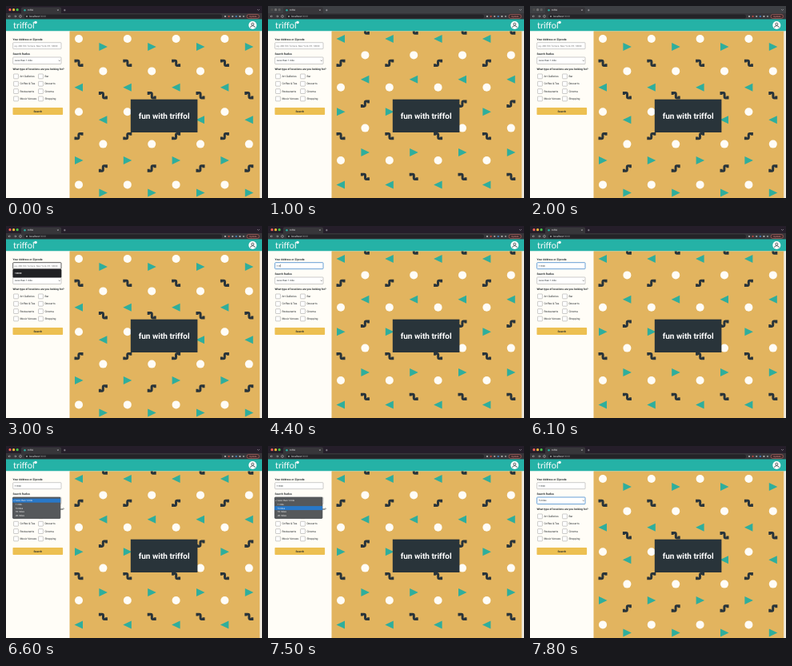
Write an HTML page that moves like this. It is 320 px wide and 240 px high and loops after 8 s.

```html
<!DOCTYPE html>
<html lang="en">
<head>
<meta charset="utf-8">
<title>triffol</title>
<style>
  html, body { margin: 0; width: 100%; height: 100%; overflow: hidden; background: #fffdf7; }
  svg { display: block; width: 100vw; height: 100vh; }
  text { font-family: Roboto, sans-serif; font-size: 3.35px; fill: #20272a; text-rendering: geometricPrecision; }
  .bold { font-weight: 700; }
  .light { fill: #fff; }
  .field { fill: #fff; stroke: #a8a8a8; stroke-width: .6; }
  .focus { stroke: #5796d2; stroke-width: .9; }
  .open { stroke: #333; stroke-width: .8; }
  .typed { font-size: 2.9px; }
  .hint { fill: #777; font-size: 2.95px; }
  .box { fill: #fff; stroke: #999; stroke-width: .5; }
</style>
</head>
<body>
<svg id="stage" viewBox="0 0 320 240" preserveAspectRatio="none">
  <defs>
    <path id="triangle" d="M-5 -5 L5.5 0 L-5 5Z" fill="#2fae9c"/>
    <path id="squiggle" d="M-4 -.8V-3.2H-1.4Q.1 -3.2 .1 -1.4V1.4Q.1 3.2 1.6 3.2H4V.8" fill="none" stroke="#29343a" stroke-width="3"/>
    <circle id="dot" r="5" fill="#fffdf7"/>
    <clipPath id="wall"><rect x="79.5" y="31.5" width="238" height="208.5"/></clipPath>
  </defs>

  <rect id="strip" width="320" height="10"/>
  <rect y="9" width="320" height="8" fill="#37363a"/>
  <path d="M19 9.5V3Q19 1.5 21 1.5H67Q69 1.5 69 3V9.5Z" fill="#37363a"/>
  <g id="lights">
    <circle cx="5" cy="4.7" r="1.6" fill="#f45f57"/>
    <circle cx="9.6" cy="4.7" r="1.6" fill="#f6bd3b"/>
    <circle cx="14.2" cy="4.7" r="1.6" fill="#45c348"/>
  </g>
  <circle cx="23.5" cy="5.2" r="1.2" fill="#25b2a6"/>
  <text x="27" y="6.2" class="light" style="font-size:2.9px">triffol</text>
  <path d="M64 4.2l1.8 1.8m0 -1.8l-1.8 1.8M72 5.2h2.6m-1.3 -1.3v2.6M314 4l1.5 1.5l1.5 -1.5" stroke="#c6c2ca" stroke-width=".5" fill="none"/>
  <path d="M6 12.9H3m1.3 -1.3L3 12.9l1.3 1.3M10 12.9h3m-1.3 -1.3l1.3 1.3l-1.3 1.3" stroke="#bbb" stroke-width=".6" fill="none"/>
  <circle cx="18" cy="12.9" r="1.4" fill="none" stroke="#bbb" stroke-width=".6"/>
  <rect x="23" y="10.4" width="247" height="5.2" rx="2.6" fill="#242327"/>
  <circle cx="26" cy="13" r=".9" fill="#aaa"/>
  <text x="29" y="14.2" style="font-size:3.2px;fill:#eee">localhost<tspan fill="#999">:3000</tspan></text>
  <g id="tools"></g>
  <rect x="301" y="10.5" width="15.5" height="5" rx="2.5" fill="#3d2a2d" stroke="#d8756d" stroke-width=".5"/>
  <text x="308.7" y="14" text-anchor="middle" style="font-size:2.8px;fill:#f19a92">Update</text>

  <rect y="16.5" width="320" height="15" fill="#25b2a6"/>
  <text x="9" y="27.8" class="light" style="font-family:Lato,sans-serif;font-size:11px">triffol</text>
  <circle cx="37" cy="20.5" r="1.8" fill="#fff"/>
  <circle cx="308.3" cy="24" r="5" fill="#fff"/>
  <g fill="none" stroke="#27363a" stroke-width=".8">
    <circle cx="308.3" cy="22.7" r="1.5"/>
    <path d="M305.3 26.9Q305.8 24.7 308.3 24.7T311.3 26.9"/>
  </g>

  <rect y="31.5" width="80" height="208.5" fill="#fffdf7"/>
  <rect x="79.5" y="31.5" width="238" height="208.5" fill="#e2b45f"/>
  <rect x="317.5" y="31.5" width="2.5" height="208.5" fill="#eee9df"/>
  <g clip-path="url(#wall)"><g id="poseA"></g><g id="poseB"></g></g>
  <rect x="155.8" y="116.7" width="83.6" height="41.3" fill="#29343a"/>
  <text x="197.6" y="140.5" class="bold light" text-anchor="middle" style="font-size:10px">fun with triffol</text>

  <text x="8.5" y="42.7" class="bold">Your Address or Zipcode</text>
  <rect id="zipBox" x="8.7" y="45.7" width="60.3" height="8" rx=".8"/>
  <text id="zip" x="10.6" y="50.8"></text>
  <rect id="caret" y="47.9" width=".4" height="3.6" fill="#222"/>
  <text x="8.5" y="61.3" class="bold">Search Radius</text>
  <rect id="radiusBox" x="8.7" y="64" width="60.3" height="8.6" rx=".8"/>
  <text id="radius" x="11" y="69.4" style="font-size:3px"></text>
  <path d="M65.8 67.7l1 1.1l1 -1.1" fill="none" stroke="#333" stroke-width=".5"/>
  <text x="8.5" y="80.2" class="bold">What type of locations are you looking for?</text>
  <g id="checks"></g>
  <rect x="8.5" y="127" width="62.6" height="9" rx=".8" fill="#edc052"/>
  <text x="39.8" y="132.7" class="bold" text-anchor="middle">Search</text>

  <g id="suggest">
    <rect x="8.4" y="54" width="61" height="10.4" rx="1" fill="#202124"/>
    <text x="11" y="60.3" class="bold light" style="font-size:2.9px">10000</text>
  </g>
  <g id="menu">
    <rect x="8" y="63.8" width="60.3" height="27.2" rx="1.4" fill="#55585b"/>
    <rect id="pick" x="8.2" width="59.9" height="5" fill="#2878c8"/>
  </g>
</svg>
<script>
const $ = id => document.getElementById(id);
const LOOP = 8000;
const MILES = ["Less than 1 mile", "1 mile", "5 miles", "10 miles", "20 miles"];
const PLACES = ["Art Galleries", "Bar", "Coffee & Tea", "Desserts",
                "Restaurants", "Cinema", "Music Venues", "Shopping"];

// The wallpaper is two staggered columns repeated across; each cycles through
// three shapes and mirrors them on every other cycle.
const GRID = 30.4;
const column = (x, y, shapes) => Array.from({ length: 7 }, (_, row) => {
  const [shape, phase] = shapes[row % 3];
  const side = (Math.floor(row / 3) + phase) % 2 ? -1 : 1;
  return [0, 1, 2, 3].map(i =>
    `<use href="#${shape}" transform="translate(${x + 2 * GRID * i} ${y + GRID * row}) scale(${side} 1)"/>`
  ).join("");
}).join("");

$("poseA").innerHTML =
  column(91, 41, [["dot", 0], ["squiggle", 0], ["triangle", 1]]) +
  column(121.4, 51, [["triangle", 0], ["dot", 0], ["squiggle", 0]]);
$("poseB").innerHTML =
  column(91, 41, [["triangle", 1], ["squiggle", 1], ["dot", 0]]) +
  column(121.4, 31, [["squiggle", 0], ["dot", 0], ["triangle", 1]]);

$("tools").innerHTML = ["#bbb", "#c94b43", "#aaa", "#4b88c8", "#bbb", "#999"].map((color, i) =>
  `<circle cx="${274 + i * 4.6}" cy="13" r="1.1" fill="${color}"/>`).join("");

$("checks").innerHTML = PLACES.map((name, i) => {
  const x = i % 2 ? 40.6 : 9.6, y = 85 + 9.35 * (i >> 1);
  return `<rect class="box" x="${x}" y="${y}" width="5.8" height="5.8" rx=".5"/>
    <text x="${x + 7.8}" y="${y + 4.1}">${name.replace("&", "&amp;")}</text>`;
}).join("");

$("menu").insertAdjacentHTML("beforeend", MILES.map((name, i) =>
  `<text x="12" y="${69.2 + 4.7 * i}" class="light" style="font-size:2.9px">${name}</text>`).join("") +
  `<path d="M9.3 68.2l.6 .7l1 -1.5" fill="none" stroke="#fff" stroke-width=".4"/>`);

// Each table holds [start time, value]; values change in hard steps.
const flips = [0, 100, 600, 1000, 1600, 2100, 2600, 3100, 3600, 4100, 4600, 5100, 6200, 6600, 7600]
  .map((time, i) => [time, i % 2]);
const active = [[0, true], [700, false], [2200, true]];
const typed = [[0, 0], [4000, 1], [4200, 2], [4400, 3], [4700, 4], [5100, 5]];
const zipState = [[0, "field"], [2700, "field open"], [4000, "field focus"], [6200, "field"]];
const caretOn = [[0, false], [4000, true], [5800, false]];
const hover = [[0, 0], [6900, 1], [7100, 2]];

const at = (table, t) => table.filter(([time]) => time <= t).pop()[1];
const show = (id, on) => $(id).setAttribute("visibility", on ? "visible" : "hidden");

function render(t) {
  const flipped = at(flips, t);
  show("poseA", !flipped);
  show("poseB", flipped);

  const awake = at(active, t);
  $("strip").setAttribute("fill", awake ? "#251e2a" : "#3e4044");
  $("lights").style.filter = awake ? "none" : "grayscale(1) brightness(.6)";

  const count = at(typed, t);
  $("zip").textContent = count ? "11100".slice(0, count) : "eg. 480 Elm Terrace, New York, NY, 10000";
  $("zip").setAttribute("class", count ? "typed" : "hint");
  $("zipBox").setAttribute("class", at(zipState, t));
  $("caret").setAttribute("x", 10.7 + count * 1.63);
  show("caret", at(caretOn, t));
  show("suggest", t >= 2700 && t < 4000);

  const chosen = t >= 7600;
  $("radius").textContent = MILES[chosen ? 2 : 0];
  $("radiusBox").setAttribute("class", chosen ? "field focus" : "field");
  show("menu", t >= 6600 && !chosen);
  $("pick").setAttribute("y", 65.7 + 4.7 * at(hover, t));
}

function tick() {
  render(performance.now() % LOOP);
  requestAnimationFrame(tick);
}
tick();
</script>
</body>
</html>
```
